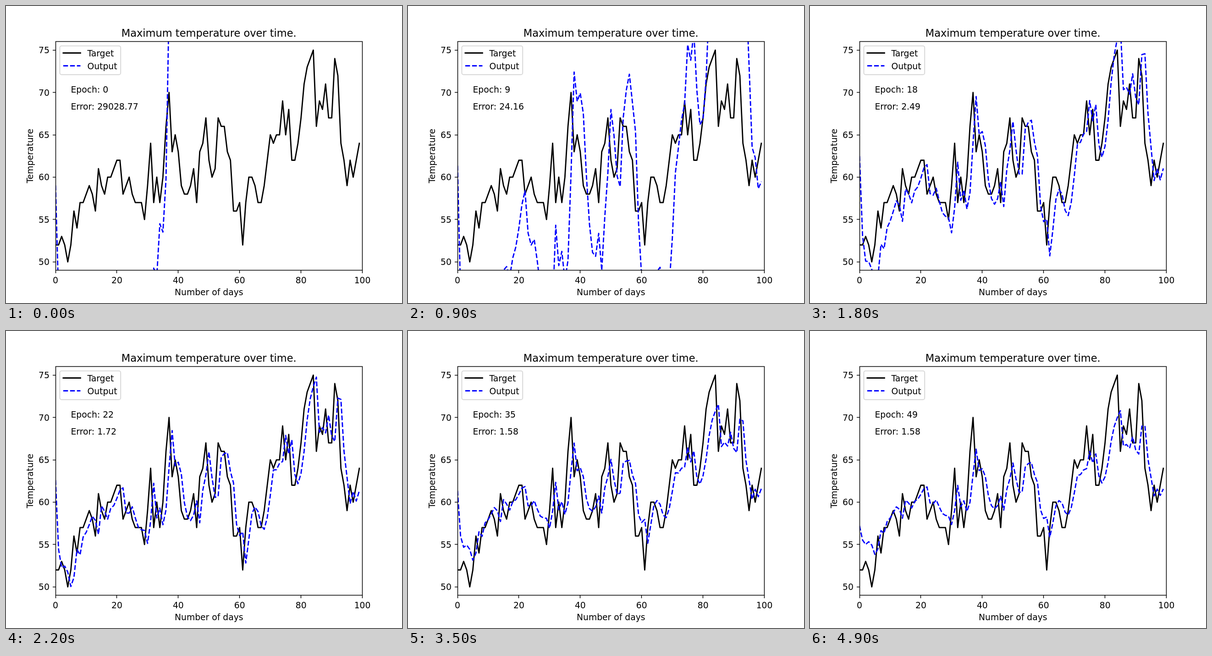
Write an HTML page that moves like this. It is 864 px wide and 648 px high and loops after 5000 ms.

```html
<!DOCTYPE html>
<html lang="en">
<head>
<meta charset="utf-8">
<title>Maximum temperature over time</title>
<style>
  html, body { margin: 0; width: 100%; height: 100%; overflow: hidden; background: #fff; }
  svg { display: block; width: 864px; height: 648px; }
  text { font: 18.75px "DejaVu Sans", sans-serif; fill: #000; white-space: pre; }
  .title { font-size: 22.5px; }
  .mid { text-anchor: middle; }
  .end { text-anchor: end; }
  .axis { fill: none; stroke: #000; stroke-width: 1.5; }
  .line { fill: none; stroke-width: 2.8125; stroke-linejoin: round; }
  .target { stroke: #000; stroke-linecap: square; }
  .output { stroke: #00f; stroke-dasharray: 10.406 4.5; }
</style>
</head>
<body>
<svg viewBox="0 0 864 648">
  <clipPath id="plot"><rect x="108" y="77.76" width="669.6" height="498.96"/></clipPath>
  <g clip-path="url(#plot)">
    <path id="target" class="line target"/>
    <path id="output" class="line output"/>
  </g>
  <g id="axes"><rect class="axis" x="108.5" y="77.5" width="669" height="499"/></g>
  <text class="title mid" x="442.8" y="67">Maximum temperature over time.</text>
  <text class="mid" x="442.8" y="631">Number of days</text>
  <text class="mid" transform="translate(59 327.2) rotate(-90)">Temperature</text>
  <text id="epoch" x="141.5" y="188.7"></text>
  <text id="error" x="141.5" y="225.7"></text>
  <rect x="117.4" y="87.1" width="132.8" height="62.6" rx="3.75" fill="#fff" fill-opacity=".8" stroke="#ccc" stroke-opacity=".8" stroke-width="1.875"/>
  <path class="line target" d="M124.9 102.5h37.5"/>
  <path class="line output" d="M124.9 130.5h37.5"/>
  <text x="177.4" y="109.7">Target</text>
  <text x="177.4" y="137.7">Output</text>
</svg>
<script>
const STEP = 100, EPOCHS = 50;

// One reading per day.
const temps = [
  52, 52, 53, 52, 50, 52, 56, 54, 57, 57, 58, 59, 58, 56, 61, 59, 58, 60, 60, 61,
  62, 62, 58, 59, 60, 58, 57, 57, 57, 55, 59, 64, 57, 60, 57, 60, 66, 70, 63, 65,
  63, 59, 58, 58, 59, 61, 57, 63, 64, 67, 62, 60, 61, 67, 66, 66, 63, 62, 56, 56,
  57, 52, 57, 60, 60, 59, 57, 57, 59, 62, 65, 64, 65, 65, 69, 65, 68, 62, 62, 64,
  67, 71, 73, 74, 75, 66, 69, 68, 71, 67, 67, 74, 72, 64, 62, 59, 62, 60, 62, 64];

const $ = id => document.getElementById(id);
const px = day => 108 + day * 6.696;
const py = temp => 576.72 - (temp - 49) * 18.48;
const snap = v => Math.floor(v) + 0.5;
const decay = (t, scale, power = 1) => Math.exp(-((t / scale) ** power));

function add(tag, attrs, text = '') {
  const el = document.createElementNS('http://www.w3.org/2000/svg', tag);
  for (const k in attrs) el.setAttribute(k, attrs[k]);
  el.textContent = text;
  $('axes').append(el);
}

// Polyline cut at the stage edges, so dashes restart where it re-enters.
function trace(vals) {
  let d = '', open = false;
  for (let i = 1; i < vals.length; i++) {
    const y0 = py(vals[i - 1]), dy = py(vals[i]) - y0;
    const cuts = [(-1 - y0) / dy, (649 - y0) / dy];
    const from = Math.max(0, Math.min(...cuts));
    const to = Math.min(1, Math.max(...cuts));
    if (!(from < to)) { open = false; continue; }
    const point = u => px(i - 1 + u).toFixed(2) + ' ' + (y0 + dy * u).toFixed(2);
    if (!open || from > 0) d += 'M' + point(from);
    d += 'L' + point(to);
    open = to === 1;
  }
  return d;
}

// Each output mixes the last reading with the last output, around a mean.
// Training lowers both weights; feedback creeps back up late on.
function predict(epoch) {
  const mean = 62.4;
  const level = 62.25 + 12.13 * decay(epoch, 1);
  const input = 0.76 - 0.0055 * epoch + 1.64 * decay(epoch, 11, 1.4);
  const feedback = 0.0063 * epoch + decay(epoch, 12.6, 1.3);
  const out = [62.6 - 0.0074 * (epoch - 22) ** 2];
  for (let i = 1; i < temps.length; i++)
    out.push(level + input * (temps[i - 1] - mean) + feedback * (out[i - 1] - mean));
  return out;
}

// A sudden drop, a slower one, then a shallow valley.
const errorAt = epoch => 28972.83 * decay(epoch, 0.5)
  + 54.06 * decay(epoch, 9.52, 2.25)
  + 1.57 + 0.00017 * (epoch - 43) ** 2;

for (let day = 0; day <= 100; day += 20) {
  add('path', { class: 'axis', d: `M${snap(px(day))} 576.5v6.56` });
  add('text', { class: 'mid', x: px(day), y: 604.6 }, day);
}
for (let temp = 50; temp <= 75; temp += 5) {
  add('path', { class: 'axis', d: `M108.5 ${snap(py(temp))}h-6.56` });
  add('text', { class: 'end', x: 94.9, y: Math.round(py(temp) + 7) }, temp);
}
$('target').setAttribute('d', trace(temps));

let shown = -1;
function draw(epoch) {
  if (epoch === shown) return;
  shown = epoch;
  $('output').setAttribute('d', trace(predict(epoch)));
  $('epoch').textContent = 'Epoch: ' + epoch;
  $('error').textContent = 'Error: ' + errorAt(epoch).toFixed(2);
}

const start = performance.now();
function tick() {
  draw(Math.floor((performance.now() - start) / STEP) % EPOCHS);
  requestAnimationFrame(tick);
}
tick();
</script>
</body>
</html>
```
